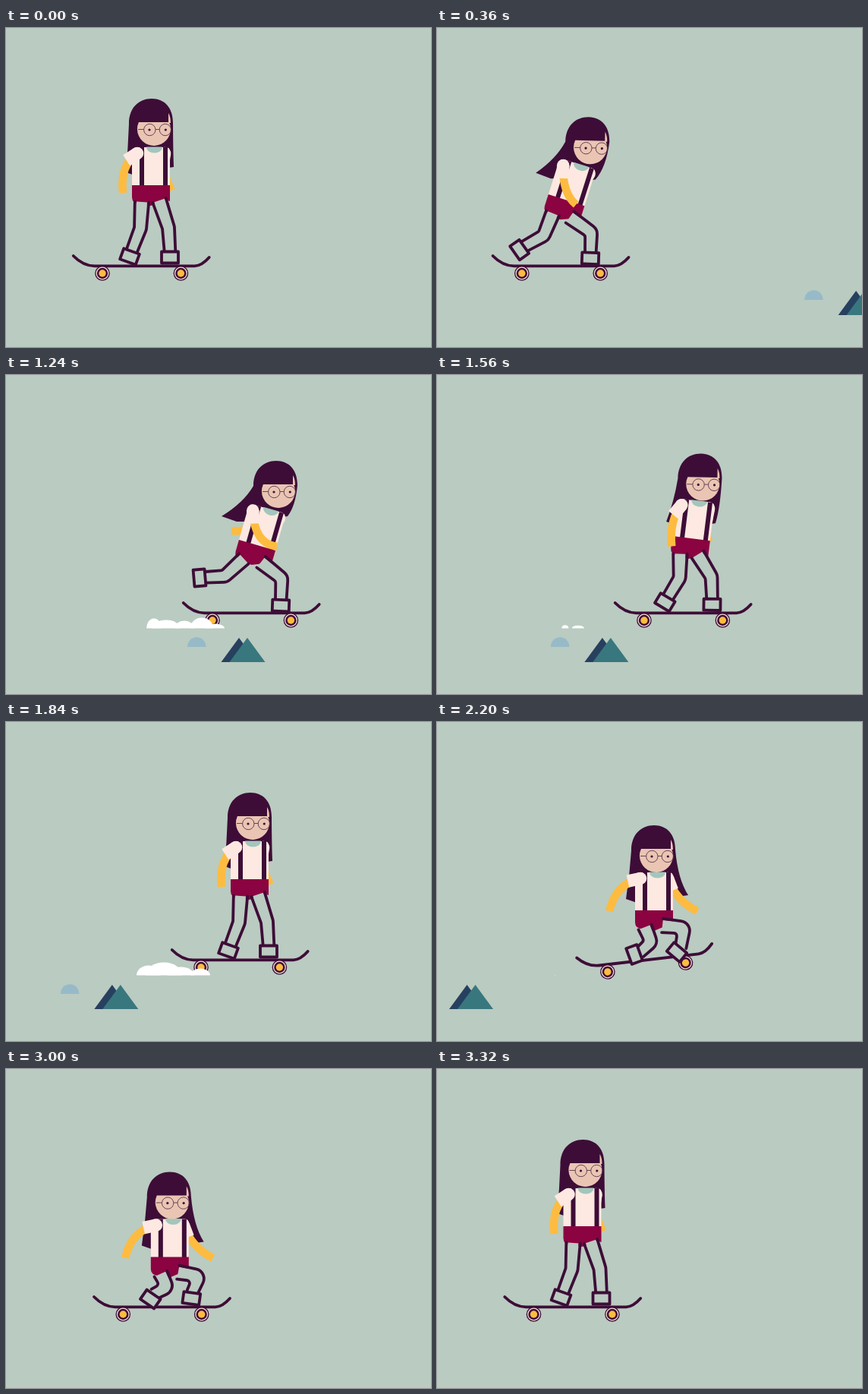
Recreate the animation shown at these times as an HTML page with a canvas. Size 560 px wide and 420 px high, loop 3.36 s.

```html
<!DOCTYPE html>
<html lang="en">
<head>
<meta charset="utf-8">
<title>Skater</title>
<style>
html, body { margin: 0; width: 100%; height: 100%; overflow: hidden; background: #bacbc1; }
canvas { display: block; }
</style>
</head>
<body>
<canvas id="stage" width="560" height="420"></canvas>
<script>
const ctx = document.getElementById('stage').getContext('2d');
const LOOP = 3360, STEP = 40, SPEED = 0.2786;
const BG = '#bacbc1', DARK = '#3d0d37', SKIN = '#eac5b3', SHIRT = '#fde9e1',
      SHORTS = '#8b0340', YELLOW = '#fdbc40', COLLAR = '#a3c6bc';

// body, head: x, y, angle; hair: left and right tip; arms: elbow, hand;
// legs: knee, foot, foot angle; board: y, angle
const stand = {
  body: [191, 207, 0], head: [195, 133, 0], hair: [-37, 57, 26, 50],
  near: [150, 180, 154, 217], far: [205, 190, 218, 214],
  back: [177, 264, 163, 301, 20], front: [214, 263, 216, 302, 0],
  board: [323, 0], lift: [0]
};
const lean = {
  body: [185.5, 230, 20], head: [221.5, 163, 3], hair: [-66, 38, 2, 54],
  near: [178, 212, 180.5, 241], far: [212, 215, 200, 232],
  back: [167.5, 274, 138.5, 296, 51], front: [218.5, 271, 217.5, 303, 2],
  board: [323, 0], lift: [0]
};
const kick = {
  body: [186, 224, 16], head: [214, 153, 0], hair: [-75, 33, 12, 33],
  near: [182, 222, 212, 226], far: [190, 207, 152, 205],
  back: [143, 265, 110, 267, 85], front: [218.5, 268, 217, 303.5, 2],
  board: [323, 0], lift: [0]
};
const tuck = {
  body: [188.5, 248, 0], head: [191.5, 176, 0], hair: [-40, 57, 42, 52],
  near: [138, 213, 129.5, 249], far: [218, 236, 245.5, 249],
  back: [184.5, 290, 162.5, 306, 70], front: [228.5, 271, 218.5, 303, 40],
  board: [323, -6.6], lift: [0]
};
const air = {
  body: [174, 167, 13], head: [198, 95, 13], hair: [-51, 54, 34, 52],
  near: [130, 102, 106, 118], far: [232, 110, 251, 136],
  back: [182, 198, 161, 215, 57], front: [212, 190, 205, 225, 20],
  board: [291, -10], lift: [0]
};
const plant = { ...lean, back: [172, 285, 142, 325, 15] };
const land = { ...tuck, back: [185, 288, 163, 303, 35], front: [228, 273, 217, 302, 8], board: [323, 0] };

const poses = [
  [0, stand], [240, plant], [460, kick], [680, lean], [920, plant], [1240, kick],
  [1440, lean], [1640, stand], [1840, stand], [2200, tuck], [2540, { ...air, lift: [-5] }],
  [2680, air], [2840, { ...air, lift: [10] }], [2980, land], [3320, stand], [LOOP, stand]
];
const drift = [
  [-40, 0.5], [0, 0], [280, -20], [680, 27.5], [1240, 145], [1440, 150], [1840, 130],
  [2200, 97.5], [2680, 55], [3320, 0.5], [LOOP, 0], [LOOP + 280, -20]
];
// reference time, left edge at that time, lobes: offset, half width, height
const puffs = [
  [680, 62, [[9, 9, 15], [22, 20, 14], [36, 18, 7]]],
  [1240, 185, [[10, 10, 13], [26, 18, 11], [50, 13, 10], [73, 15, 14], [90, 13, 6]]],
  [1840, 172, [[16, 16, 13], [36, 24, 17], [58, 18, 11], [84, 13, 9]]]
];

const clamp = v => Math.max(0, Math.min(1, v));
const rad = deg => deg * Math.PI / 180;

function poseAt(t) {
  const i = poses.findIndex(k => k[0] > t);
  const [t0, a] = poses[i - 1], [t1, b] = poses[i];
  const u = (t - t0) / (t1 - t0), e = u * u * (3 - 2 * u);
  const mix = {};
  for (const part in a) mix[part] = a[part].map((v, n) => v + (b[part][n] - v) * e);
  return mix;
}

function driftAt(t) {
  const i = drift.findIndex(k => k[0] > t);
  const [p, a, b, n] = drift.slice(i - 2, i + 2);
  const d = b[0] - a[0], u = (t - a[0]) / d;
  const m0 = (b[1] - p[1]) / (b[0] - p[0]) * d, m1 = (n[1] - a[1]) / (n[0] - a[0]) * d;
  const u2 = u * u, u3 = u2 * u;
  return (2 * u3 - 3 * u2 + 1) * a[1] + (u3 - 2 * u2 + u) * m0
    + (3 * u2 - 2 * u3) * b[1] + (u3 - u2) * m1;
}

function within(x, y, deg, draw) {
  ctx.save();
  ctx.translate(x, y);
  ctx.rotate(rad(deg));
  draw();
  ctx.restore();
}

function fill(color, path) { ctx.fillStyle = color; ctx.fill(path); }

function stroke(color, width, path, cap = 'butt') {
  ctx.strokeStyle = color;
  ctx.lineWidth = width;
  ctx.lineCap = cap;
  ctx.lineJoin = 'round';
  ctx.stroke(path);
}

function disc(x, y, r, color) {
  const p = new Path2D();
  p.arc(x, y, r, 0, 7);
  fill(color, p);
}

function onBody([x, y, deg], px, py) {
  const c = Math.cos(rad(deg)), s = Math.sin(rad(deg));
  return [x + px * c - py * s, y + px * s + py * c];
}

function scenery(t) {
  ctx.save();
  ctx.translate(439.5 - SPEED * (t - 680), 378);
  fill('#27405f', new Path2D('M0 0L23.5-32L47 0Z'));
  fill('#39777e', new Path2D('M11 0L34.5-32L58 0Z'));
  fill('#97bac8', new Path2D('M-44.5-20a12.3 12.8 0 0 1 24.6 0Z'));
  ctx.restore();
}

function dust(t) {
  for (const [time, left, lobes] of puffs) lobes.forEach(([dx, rx, h], i) => {
    const s = clamp((t - time + 220) / 180) * clamp((time + 220 + i * 50 - t) / 160);
    if (!s) return;
    const p = new Path2D();
    p.ellipse(left + dx - SPEED * (t - time), 333.5, rx * s, h * s, 0, Math.PI, 2 * Math.PI);
    fill('#fff', p);
  });
}

function board([y, deg]) {
  within(178.7, y, deg, () => {
    stroke(DARK, 3.8, new Path2D('M-90-23Q-77-9.7-62-9.7H70Q79-9.7 89-21'), 'round');
    for (const x of [-51.7, 51.7]) {
      disc(x, 0, 9.8, DARK);
      disc(x, 0, 8.5, '#f5dcd8');
      disc(x, 0, 7.2, DARK);
      disc(x, 0, 4.7, YELLOW);
    }
  });
}

function arm([x, y], [ex, ey, hx, hy]) {
  stroke(YELLOW, 10.5, new Path2D(`M${x} ${y}Q${ex} ${ey} ${hx} ${hy}`));
  const k = 17 / Math.hypot(ex - x, ey - y);
  disc(x, y, 8.3, SHIRT);
  stroke(SHIRT, 16.6, new Path2D(`M${x} ${y}l${(ex - x) * k} ${(ey - y) * k}`));
}

function normal(x0, y0, x1, y1) {
  const d = Math.hypot(x1 - x0, y1 - y0);
  return [(y1 - y0) / d, (x0 - x1) / d];
}

// two edges either side of hip, knee and ankle: a round outer bend, a tight inner one
function leg([x, y], [kx, ky, fx, fy, deg]) {
  const ax = fx + 8 * Math.sin(rad(deg)), ay = fy - 8 * Math.cos(rad(deg));
  const [ux, uy] = normal(x, y, kx, ky), [vx, vy] = normal(kx, ky, ax, ay);
  const miter = 8 / Math.max(0.6, 1 + ux * vx + uy * vy);
  const turn = Math.sign(ux * vy - uy * vx);
  const edges = [1, -1].map(side => {
    const p = new Path2D();
    const end = [ax + side * vx * 7.3, ay + side * vy * 7.3];
    p.moveTo(x + side * ux * 9.2, y + side * uy * 9.2);
    p.arcTo(kx + side * (ux + vx) * miter, ky + side * (uy + vy) * miter, ...end, side === turn ? 13 : 4);
    p.lineTo(...end);
    return p;
  });
  stroke(BG, 14, new Path2D(`M${x} ${y}L${kx} ${ky}L${ax} ${ay}`));
  for (const edge of edges) stroke(DARK, 3.8, edge, 'round');
  within(fx, fy, deg, () => {
    const shoe = new Path2D('M-11-7.5H11V7.5H-11Z');
    fill(BG, shoe);
    stroke(DARK, 3.8, shoe);
  });
}

function hair([lx, ly, rx, ry]) {
  fill(DARK, new Path2D(`M${lx} ${ly}Q${-33 + (lx + 33) * 0.3} ${ly * 0.45} -33-7
    C-33-28-20-40-3-40C14-40 25-28 25-8Q${25 + (rx - 25) * 0.2} ${ry * 0.6} ${rx} ${ry}
    L${rx - 14} ${ry + 2}L-5 40L${lx + 20} ${ly + 7}Z`));
}

function face() {
  const p = new Path2D();
  p.arc(0, 0, 22, Math.asin(-9 / 22), Math.PI + Math.asin(9 / 22));
  p.closePath();
  fill(SKIN, p);
  fill(SKIN, new Path2D('M19-8V-21Q22-16 22-8Z'));
  const glasses = new Path2D('M-21 0.5H-13.4M2 0.5H7.2');
  for (const x of [-5.7, 14.9]) {
    glasses.moveTo(x + 7.7, 1);
    glasses.arc(x, 1, 7.7, 0, 7);
  }
  stroke('#57384a', 0.9, glasses);
  disc(-6, 1, 1.6, DARK);
  disc(15.3, 1, 1.6, DARK);
}

function torso() {
  fill(SHIRT, new Path2D('M-25 1V-43Q-25-50-18-50H20Q25-50 25-44V1Z'));
  fill(COLLAR, new Path2D('M-6-50.5H15A10.5 8 0 0 1-6-50.5Z'));
  fill(DARK, new Path2D('M-15-50h6V1h-6ZM16-50h6V1H16Z'));
  fill(SHORTS, new Path2D('M-25 0H25V21L19 19L0 27L-14 25Q-25 24-25 16Z'));
}

function girl(p) {
  within(p.head[0], p.head[1], p.head[2], () => hair(p.hair));
  arm(onBody(p.body, 18, -42), p.far);
  within(...p.body, torso);
  leg(onBody(p.body, -12, 22), p.back);
  leg(onBody(p.body, 11, 20), p.front);
  arm(onBody(p.body, -18, -42), p.near);
  within(...p.head, face);
}

function draw(t) {
  const p = poseAt(t);
  ctx.fillStyle = BG;
  ctx.fillRect(0, 0, 560, 420);
  scenery(t);
  within(driftAt(t), p.lift[0], 0, () => {
    board(p.board);
    girl(p);
  });
  dust(t);
}

const start = performance.now();
function tick() {
  const t = (performance.now() - start) % LOOP;
  draw(Math.floor(t / STEP) * STEP);
  requestAnimationFrame(tick);
}
tick();
</script>
</body>
</html>
```
